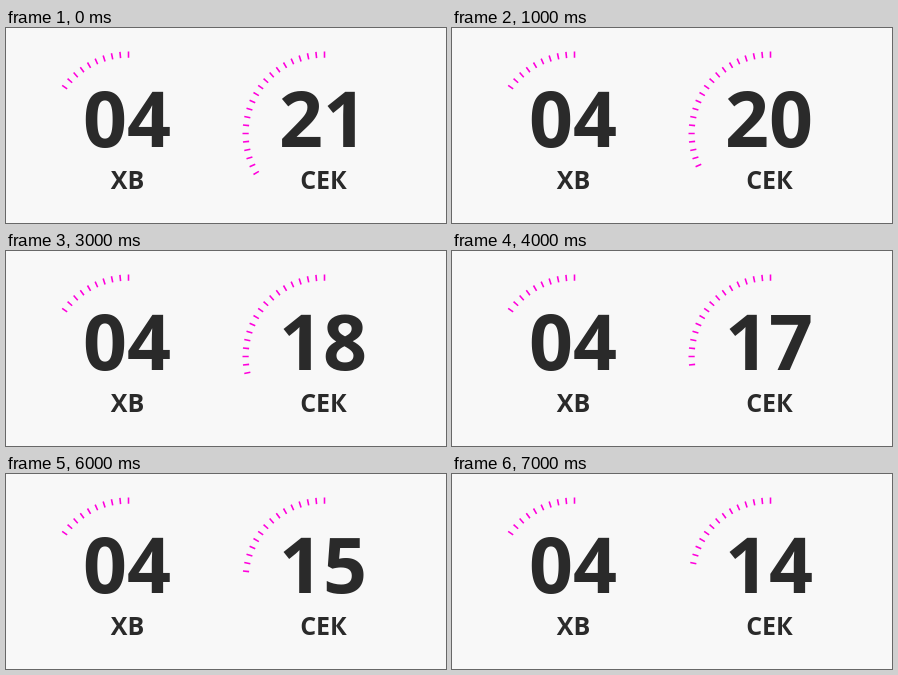
Animation, 440 px wide and 195 px high, one loop 8000 ms. Source, as an HTML page:

```html
<!DOCTYPE html>
<html lang="uk">
<head>
<meta charset="utf-8">
<style>
  html, body { margin: 0; width: 100%; height: 100%; overflow: hidden; background: #f8f8f8; }
  svg { display: block; width: 440px; height: 195px; }
  text { font-family: "Open Sans", "Noto Sans", sans-serif; font-weight: 700; fill: #2a2a2a; text-anchor: middle; }
  .value { font-size: 77px; }
  .label { font-size: 25px; }
  path { stroke: #ff00dc; stroke-width: 1.6; }
</style>
</head>
<body>
<svg viewBox="0 0 440 195">
  <g id="minutes" transform="translate(122.5 105.5)">
    <path/>
    <text class="value" x="-1.6" y="13"></text>
    <text class="label" x="-1" y="55.5">ХВ</text>
  </g>
  <g id="seconds" transform="translate(318.5 105.5)">
    <path/>
    <text class="value" x="-1.6" y="13"></text>
    <text class="label" x="-1" y="55.5">СЕК</text>
  </g>
</svg>
<script>
  const LOOP = 8000, FIRST_SECOND = 21;
  const INNER = 75.8, OUTER = 82;

  // Ticks run counter-clockwise from the top, 6 degrees apart.
  function tick(i) {
    const a = i * Math.PI / 30;
    const point = r => `${(-r * Math.sin(a)).toFixed(2)} ${(-r * Math.cos(a)).toFixed(2)}`;
    return `M${point(INNER)}L${point(OUTER)}`;
  }

  function showDial(id, value, ticks) {
    const dial = document.getElementById(id);
    dial.querySelector('.value').textContent = String(value).padStart(2, '0');
    dial.querySelector('path').setAttribute('d', Array.from({ length: ticks }, (_, i) => tick(i)).join(''));
  }

  let shown;
  function draw() {
    const seconds = FIRST_SECOND - Math.floor(performance.now() % LOOP / 1000);
    if (seconds !== shown) showDial('seconds', shown = seconds, seconds);
    requestAnimationFrame(draw);
  }

  showDial('minutes', 4, 10);
  draw();
</script>
</body>
</html>
```
